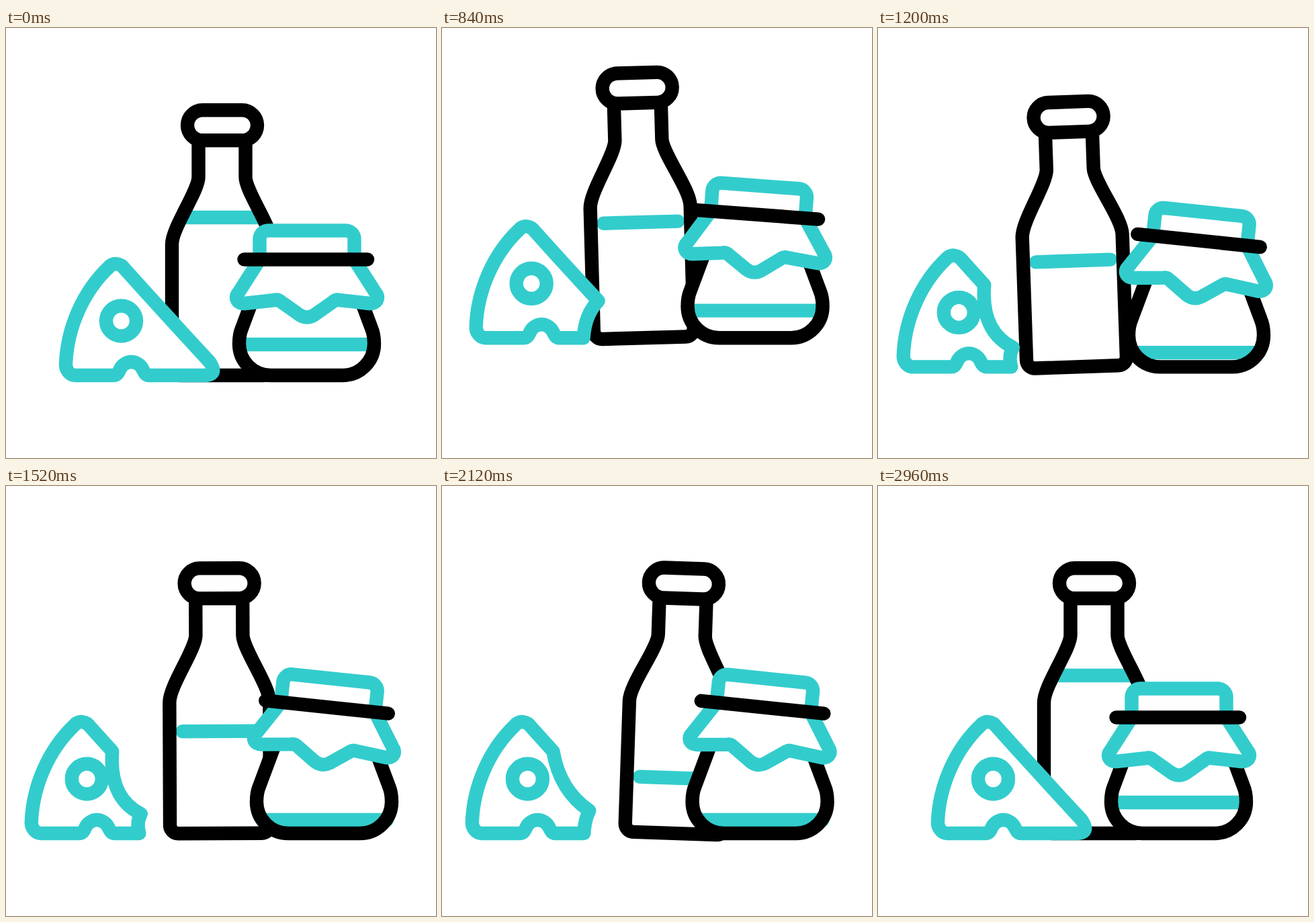
An HTML page that plays this animation: 640x640 px, repeating every 3 s.

```html
<!DOCTYPE html>
<html lang="en">
<head>
<meta charset="utf-8">
<title>Dairy icon</title>
<style>
  html, body { margin: 0; width: 100%; height: 100%; overflow: hidden; background: #fff; }
  svg { display: block; width: 100%; height: 100%; }
  g { stroke-width: 20.4; stroke-linecap: round; stroke-linejoin: round; }
  .ink { stroke: #000; }
  .teal { stroke: #33cccc; }
  .solid { fill: #fff; }
  .line { fill: none; }
</style>
</head>
<body>
<svg viewBox="0 0 640 640">
  <g id="bottle">
    <path class="glass solid"/>
    <path id="milk" class="teal line" d="M266 0H377"/>
    <path class="glass ink line"/>
    <rect class="ink solid" x="270" y="122.3" width="104" height="45" rx="22.5"/>
  </g>
  <g id="cheese" class="teal">
    <path id="wedge" class="solid"/>
    <circle class="line" cx="171.5" cy="436" r="22.5"/>
  </g>
  <g id="jar">
    <path class="pot solid"/>
    <path id="jam" class="teal line" d="M357 0H541"/>
    <path class="pot ink line"/>
    <g id="lid">
      <rect class="teal solid" x="377.5" y="301.5" width="141" height="50" rx="12.5"/>
      <path class="skirt teal solid"/>
      <path class="ink line" d="M354.5 344.5H538"/>
    </g>
  </g>
</svg>
<script>
const LOOP = 3000;
const [bottle, milk, cheese, wedge, jar, jam, lid] =
  ['bottle', 'milk', 'cheese', 'wedge', 'jar', 'jam', 'lid'].map(id => document.getElementById(id));

// Draws the left half from rows (2 numbers: line, 6: curve), then its mirror image about cx.
function mirrored(cx, rows) {
  const flip = (x, y) => `${2 * cx - x} ${y}`;
  let d = rows.map((row, i) => (i ? (row.length > 2 ? 'C' : 'L') : 'M') + row.join(' ')).join('');
  d += 'L' + flip(...rows.at(-1).slice(-2));
  for (let i = rows.length - 1; i > 0; i--) {
    const [ax, ay, bx, by] = rows[i];
    const to = flip(...rows[i - 1].slice(-2));
    d += rows[i].length > 2 ? `C${flip(bx, by)} ${flip(ax, ay)} ${to}` : 'L' + to;
  }
  return d;
}

function shape(name, d) {
  document.querySelectorAll('.' + name).forEach(node => node.setAttribute('d', d));
}

shape('glass', mirrored(321.5, [[286.5, 167], [286.5, 222], [286.5, 243, 247, 297, 247, 322],
  [247, 504.5], [247, 511.5, 252.5, 517, 259.5, 517]]));
shape('pot', mirrored(447.5, [[376, 380], [351, 447], [348, 454, 347, 461, 347, 470],
  [347, 496, 368, 517, 394, 517]]));
shape('skirt', mirrored(448, [[378, 344], [346, 394], [339, 402, 345, 411, 355, 410],
  [400, 405], [403, 404, 407, 405.5, 410, 408], [437, 427], [441, 429.5, 444, 430.5, 448, 430.5]]));

// Right side of the wedge: bend, tip, bend, foot.
const WHOLE = [255, 445, 303, 497, 317, 517, 294, 517];
const CORNER = [240, 428.5, 271, 462, 251, 482, 249, 517];
const SIDE = [204, 464, 252, 488, 245, 500, 249.5, 517];

const mix = (p, q, k) => p.map((v, i) => v + (q[i] - v) * k);

const wedgePath = side =>
  `M89 500C91 446 115 392 153 356C159 349 170 349 177 359L209.5 395Q${side.join(' ')}`
    .replace(/Q(\S+ \S+ \S+ \S+) /, 'Q$1Q') +
  'H213C208 517 206 513 204 509C201 502 194 497 186.5 497' +
  'C179 497 172 502 169 509C167 514 165 517 160 517H103C95 517 88.5 509 89 500Z';

const smooth = u => u * u * (3 - 2 * u);

// Cubic easing with horizontal handles at a and b.
function curve(u, a, b) {
  let lo = 0, hi = 1;
  for (let i = 0; i < 24; i++) {
    const m = (lo + hi) / 2, n = 1 - m;
    if (3 * a * m * n * n + 3 * b * m * m * n + m * m * m < u) lo = m; else hi = m;
  }
  return smooth(lo);
}

const span = (t, from, to) => Math.min(1, Math.max(0, (t - from) / (to - from)));
const move = (t, from, to) => smooth(span(t, from, to));
const settle = (t, from, to) => curve(span(t, from, to), 0.37, 0.42);

const place = (node, x, y, turn = 0, cx = 0, cy = 0) =>
  node.setAttribute('transform', `translate(${x} ${y}) rotate(${turn} ${cx} ${cy})`);

function draw(t) {
  const hop = -57.5 * (move(t, 380, 895) - move(t, 940, 1314));

  const sway = -move(t, 380, 1015) + 2 * move(t, 1200, 1895) - settle(t, 2073, 2738);
  place(bottle, 25.6 * sway, hop, 1.97 * sway, 321.5, 517);
  place(milk, 0, 282 + 77 * move(t, 380, 1015) + 76 * move(t, 1400, 2100)
    - 153 * settle(t, 2100, 2765));

  const away = move(t, 380, 1065) - settle(t, 1960, 2700);
  place(cheese, -51.2 * away, hop);
  const regrow = move(t, 1950, 2365);
  const corner = mix(WHOLE, CORNER, move(t, 480, 760) - regrow);
  wedge.setAttribute('d', wedgePath(mix(corner, SIDE, move(t, 920, 1160) - regrow)));

  const open = move(t, 380, 1093) - move(t, 2068, 2762);
  place(jar, 26 * open, hop);
  place(lid, 5.3 * open, -15.5 * open, 6 * open, 446.25, 344.5);
  place(jam, 0, 471 + 26 * (move(t, 658, 1284) - move(t, 2237, 2877)));
}

const start = performance.now();
function tick() {
  draw((performance.now() - start) % LOOP);
  requestAnimationFrame(tick);
}
tick();
</script>
</body>
</html>
```
